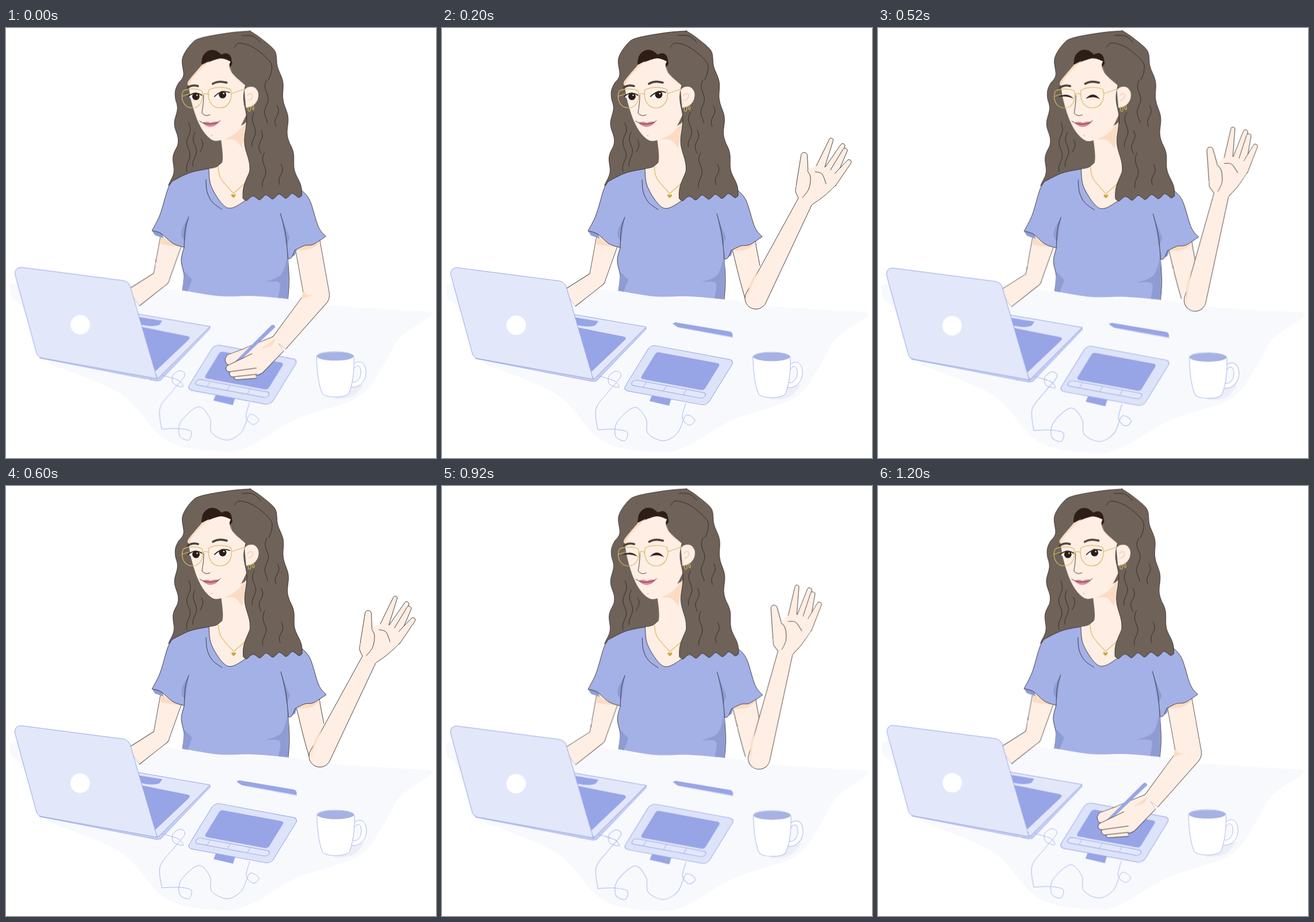
Recreate the animation shown at these times as an HTML page. Size 748 by 748 pixels, loop 1.4 s.

```html
<!DOCTYPE html>
<html lang="en">
<head>
<meta charset="utf-8">
<title>Waving illustrator</title>
<style>
html, body { margin: 0; width: 100%; height: 100%; overflow: hidden; background: #fff; }
svg { display: block; width: 100%; height: 100%; }
.ink, .wire, .gold, .brow { fill: none; stroke-linecap: round; stroke-linejoin: round; }
.ink { stroke: #2b2422; stroke-width: .85; }
.edge { stroke: #2b2422; stroke-width: 1.4; }
.skin { fill: #feeee4; }
.tan { fill: #fbdcc3; }
.hair { fill: #6f6259; }
.shirt { fill: #a4b1e7; }
.dim { fill: #8f9cd3; }
.pale { fill: #e3e7fa; stroke: #98a7e5; }
.blue { fill: #97a5e6; }
.wire { stroke: #aab6ec; }
.cup { fill: #fff; }
.gold { stroke: #d8bd5f; stroke-width: 1.2; }
.dark { fill: #2d1d16; }
.brow { stroke: #4c403b; stroke-width: 3.6; }

#scene, .write, .wave, .arm, .open, .shut { animation: 1.4s step-end infinite; }
#scene { transform-origin: 200px 100px; animation-name: size; }
.write { animation-name: write; }
.wave { animation-name: wave; }
.arm { transform-origin: 548px 471px; animation-name: swing; }
.open { animation-name: open; }
.shut { animation-name: shut; }
@keyframes size {
  0%, 85.714%, 100% { transform: scale(.998); }
  14.286%, 42.857%, 71.428% { transform: scale(1); }
  28.571%, 57.143% { transform: scale(1.002); }
}
@keyframes write {
  0%, 85.714%, 100% { visibility: visible; }
  14.286% { visibility: hidden; }
}
@keyframes wave {
  0%, 85.714%, 100% { visibility: hidden; }
  14.286% { visibility: visible; }
}
@keyframes swing {
  0%, 42.857%, 71.428%, 100% { transform: none; }
  28.571%, 57.143% { transform: translate(5px, 2.5px) rotate(-13deg); }
}
@keyframes open {
  0%, 42.857%, 71.428%, 100% { visibility: visible; }
  28.571%, 57.143% { visibility: hidden; }
}
@keyframes shut {
  0%, 42.857%, 71.428%, 100% { visibility: hidden; }
  28.571%, 57.143% { visibility: visible; }
}
</style>
</head>
<body>
<svg viewBox="0 0 748 748">
<defs>
  <g id="left-arm">
    <path data-taper="289 365 20 270 436 14"/>
    <path data-taper="222 470 17 270 436 14"/>
  </g>
  <g id="right-arm">
    <path data-taper="523 365 22 541 465 22"/>
    <path data-taper="475 550 15 542 467 20"/>
    <path data-taper="475 550 15 432 579 26"/>
    <path data-taper="428 570 15 392 578 10"/>
  </g>
</defs>
<g id="scene">
  <path fill="#f7f9fd" data-p="5 447 70 437 140 434 240 448 370 467 491 472 560 483 737 494 / 739 502 685 541 655 592 612 644 505 682 425 728 375 738 280 719 200 638 75 585 / 29 490 10 470 5 447z"/>

  <use class="edge" href="#left-arm"/>
  <use class="skin" href="#left-arm"/>
  <path class="tan" data-p="270 360 285 373 309 382 / 285 379 269 376 / 270 360z"/>

  <!-- laptop -->
  <path d="M58 575L262 615L269 614L355 524V520L262 608Z" fill="#c6cef1" stroke="#98a7e5" stroke-width=".8"/>
  <path class="pale" d="M228 498L355 520L264 611L240 560Z"/>
  <path class="blue" d="M232 520L317 537Q322 539 318 543L260 598ZM229 503L272 510L267 517Q254 522 233 516Z"/>
  <path class="pale" d="M15 428Q16 416 27 417L204 440Q213 442 216 450L263 611L62 575Q55 573 53 567Z"/>
  <circle cx="129" cy="517" r="17" fill="#fff"/>

  <!-- cable and tablet -->
  <path class="wire" data-p="272 605 300 614 308 625 292 620 290 606 303 597 311 606 290 632 268 662 271 699 / 300 698 322 703 318 718 302 710 305 685 335 660 355 680 358 705 385 718 410 704 424 674 440 682 430 691 418 678 424 653"/>
  <path class="blue" d="M366 637L399 644L395 657L361 649Z"/>
  <g transform="matrix(1 .186 -.522 .848 363 551)">
    <rect class="pale" width="146" height="93" rx="9" style="fill:#dde3f8"/>
    <rect class="blue" x="16" y="11" width="111" height="55" rx="5"/>
    <rect class="pale" x="7" y="70" width="127" height="11" rx="5.5"/>
    <path class="wire" d="M29 70v11m35-11v11m35-11v11"/>
  </g>

  <!-- cup -->
  <path d="M570 646Q600 648 612 636L624 620L600 625Z" fill="#eceef8"/>
  <path class="wire cup" d="M604 588C612 576 628 580 627 602C626 618 612 628 601 625V616C610 620 617 612 618 602C619 586 610 584 604 597Z"/>
  <path class="wire cup" d="M541 572C541 561 605 561 606 573C607 600 603 623 597 637C590 645 557 645 551 637C544 622 541 595 541 572Z"/>
  <ellipse cx="573.5" cy="572" rx="32" ry="7.5" fill="#a6b2e3"/>

  <!-- drawing arm -->
  <g class="write">
    <use class="edge" href="#right-arm"/>
    <use class="skin" href="#right-arm"/>
    <path class="tan" data-p="518 456 524 465 536 465 / 524 469 514 473 / 518 456z"/>
    <path class="tan" data-p="470 541 462 553 446 558 / 460 548 470 541z"/>
    <path class="blue" d="M396 584L462 518Q467 515 469 521L407 580Z"/>
    <path class="skin ink" data-taper="432 598 13 402 608 5"/>
    <path class="skin ink" data-taper="432 590 14 395 602 6"/>
    <path class="skin ink" data-taper="432 580 13 389 593 6"/>
  </g>

  <!-- waving arm -->
  <g class="wave">
    <path d="M402 515L410 514L506 532V539L410 521Z" fill="#c9d0f2"/>
    <path class="blue" d="M401 514L406 512L501 528Q505 529 505 533V537L410 520Z"/>
    <path class="skin ink" data-p="527 470 / 516 430 502 372 / 545 358 / 546 376 553 413"/>
    <g class="arm">
      <path class="skin ink" data-taper="632 301 13 546 470 19"/>
      <path class="tan" data-p="553 415 536 446 530 474 / 537 453 553 415z"/>
      <path class="skin ink" data-taper="655 250 8 677 195 3.5"/>
      <path class="skin ink" data-taper="668 254 8 697 205 4"/>
      <path class="skin ink" data-taper="676 262 8 701 213 4"/>
      <path class="skin ink" data-taper="678 270 8 708 233 4"/>
      <path class="skin ink" data-taper="627 275 11 630 222 5.5"/>
      <path class="skin" data-p="616 276 637 248 660 240 686 258 674 283 644 308 / 620 297 616 276z"/>
      <path class="ink" data-p="616 276 615 284 620 296"/>
      <path class="ink" data-p="684 274 674 284 660 296 644 307"/>
      <path class="ink" data-p="636 249 641 260 638 280 627 295"/>
      <path class="ink" data-p="649 250 661 254 668 271"/>
    </g>
  </g>
  <path class="tan" data-p="503 385 520 378 546 374 / 530 385 503 388z"/>

  <!-- hair behind -->
  <path class="hair ink" data-p="425 5 390 8 340 17 322 28 307 53 309 82 300 96 / ~3,57 295 125 297 205 285 275 / 296 264 320 255 354 245 / 366 242 376 234 / 420 200 / 440 100 / 425 5z"/>
  <path class="dark" data-p="340 62 343 48 353 39 365 39 375 46 / 384 44 391 49 394 62 / 385 68 342 66 / 340 62z"/>

  <!-- neck -->
  <path class="skin" data-p="374 190 376 235 351 246 / 358 288 395 316 426 297 / 418 165 / 374 190z"/>
  <path class="tan" data-p="418 163 402 181 378 194 / 398 195 411 209 / 418 163z"/>
  <path class="gold" data-p="369 241 374 262 396 288 / 420 267"/>
  <path d="M396 296L392.5 292.5Q391.5 289 394 289.3L396 290.5L398 289.3Q400.5 289 399.5 292.5Z" fill="#c5a83f"/>

  <!-- shirt -->
  <path class="dim" d="M254 353L270 350L274 366L259 361ZM488 370L491 402L503 396L510 375Z"/>
  <g id="torso"></g>
  <path class="dim" data-p="318 329 307 349 306 363 312 371 / 318 329z"/>
  <path class="dim" data-p="479 325 486 345 494 365 / 488 380 / 479 325z"/>
  <path class="dim" data-p="492 388 480 428 452 442 / 476 444 474 470 / 491 472 / 492 388z"/>
  <path class="dim" data-p="310 424 324 438 / 316 459 / 307 457 / 310 424z"/>
  <path class="ink" data-p="318 329 312 350 310 382"/>
  <path class="ink" data-p="478 323 487 360 491 402"/>
  <path class="ink" data-p="348 264 350 285 359 303 376 316"/>

  <!-- face -->
  <path class="skin" data-p="341 64 372 53 391 58 / 389 66 395 80 417 100 / 419 150 / 402 181 380 194 / 362 196 346 183 333 160 322 125 317 93 / 328 80 341 64z"/>
  <path class="tan" data-p="354 57 326 86 319 101 / 317 93 341 64 / 354 57z"/>
  <path class="tan" data-p="390 66 397 84 416 101 / 395 80 390 66z"/>
  <path class="brow" d="M316 104Q324 98 334 101M360 97Q370 91 384 95"/>
  <g class="open">
    <path d="M318 119Q330 109 341 118Q335 127 323 124ZM363 119Q375 107 389 115Q383 126 370 123Z" fill="#fff"/>
    <circle class="dark" cx="330.500" cy="119" r="6.500"/>
    <circle class="dark" cx="377" cy="116" r="6.500"/>
    <path class="ink" style="stroke-width:1.8" d="M317 119Q329 109 341 117M363 119Q375 107 389 112"/>
    <g fill="#fff"><circle cx="332.500" cy="117" r="1.200"/><circle cx="379" cy="114" r="1.300"/></g>
  </g>
  <path class="dark shut" d="M313 120Q330 111 340 123Q329 117 313 120ZM361 123Q374 108 386 124Q374 117 361 123Z"/>
  <path class="ink" d="M344 117C344 131 342 140 341 148Q347 155 355 151"/>
  <path d="M342 165Q350 161 356 165Q364 161 371 164Q364 172 355 172Q347 171 342 165Z" fill="#da879c"/>
  <path class="ink" d="M337 162Q346 168 356 167Q367 167 373 161"/>
  <circle cx="358" cy="187" r=".8" fill="#b98a70"/>

  <!-- hair in front -->
  <path class="hair ink" data-p="417 100 / ~3,80 416 170 422 250 413 297 / ~4,23 515 291 / ~2.5,62 494 200 485 125 473 55 / 467 38 443 17 425 5"/>
  <path class="ink" data-p="397 34 407 26 433 35 460 59 462 76 457 90"/>
  <path class="ink" data-p="411 13 430 14 443 25"/>
  <g id="strands"></g>

  <!-- ear and glasses -->
  <path class="skin" data-p="415 108 421 103 432 103 439 112 438 125 430 135 418 139 / 415 108z"/>
  <path d="M420 118Q425 111 429 116Q430 124 421 126" fill="none" stroke="#f6ceb2" stroke-width="1.400"/>
  <path class="gold" d="M422 137Q420 145 424 145Q427 144 425 137M428 135Q428 142 431 142Q433 140 430 134"/>
  <path class="gold" d="M308 110C315 105 333 105 341 109C345 125 338 139 324 139C310 139 303 124 308 110ZM353 108C360 103 380 101 391 107C395 120 390 139 372 139C356 139 350 122 353 108ZM342 116Q347 112 353 116M393 114L416 106M306 119L318 115"/>
</g>
</svg>
<script>
// Points along a polyline, pushed sideways by a sine wave.
function wavy(pts, amp, period) {
  const out = [pts[0]];
  let s = 0;
  for (let i = 1; i < pts.length; i++) {
    const [x, y] = pts[i - 1], dx = pts[i][0] - x, dy = pts[i][1] - y;
    const len = Math.hypot(dx, dy), n = Math.ceil(len / 6);
    for (let k = 1; k <= n; k++) {
      const t = k / n, off = amp * Math.sin((s + t * len) / period * 2 * Math.PI) / len;
      out.push([x + dx * t - dy * off, y + dy * t + dx * off]);
    }
    s += len;
  }
  return out;
}

// Smooth curve through points; "/" marks a corner, "~amp,period" a wavy run.
function smooth(text) {
  let last, d = '';
  for (const run of text.replace('z', '').split('/')) {
    const words = run.trim().split(/\s+/);
    const wave = words[0][0] === '~' && words.shift().slice(1).split(',').map(Number);
    let p = last ? [last] : [];
    for (let i = 0; i < words.length; i += 2) p.push([+words[i], +words[i + 1]]);
    if (wave) p = wavy(p, ...wave);
    if (!last) d = 'M' + p[0];
    for (let i = 0; i + 1 < p.length; i++) {
      const b = p[i], c = p[i + 1], a = p[i - 1] || b, e = p[i + 2] || c;
      const c1 = b.map((v, j) => v + (c[j] - a[j]) / 6);
      const c2 = c.map((v, j) => v - (e[j] - b[j]) / 6);
      d += 'C' + [c1, c2, c].join(' ');
    }
    last = p[p.length - 1];
  }
  return d + (text.endsWith('z') ? 'Z' : '');
}

// Limb or finger: open at the first end, round at the second.
function taper(text) {
  const [x, y, r, tx, ty, tr] = text.split(' ').map(Number);
  const len = Math.hypot(tx - x, ty - y), nx = (y - ty) / len, ny = (tx - x) / len;
  return `M${x + nx * r} ${y + ny * r}L${tx + nx * tr} ${ty + ny * tr}` +
    `A${tr} ${tr} 0 0 0 ${tx - nx * tr} ${ty - ny * tr}L${x - nx * r} ${y - ny * r}`;
}

const path = (cls, pts) => `<path class="${cls}" data-p="${pts}"/>`;

const torso = '307 457 / 310 432 305 405 310 382 / 290 375 270 358 254 353 / 268 325 281 282 289 267 / ' +
  '320 252 353 245 / 357 275 377 307 395 313 426 294 / 513 281 / 529 300 544 346 557 363 / ' +
  '535 377 520 379 503 387 / 497 400 491 402 / 493 440 491 472';
document.getElementById('torso').innerHTML =
  path('shirt', torso + ' / 430 467 370 467 307 457z') + path('ink', torso);

// Hair strands: top x, top y, length.
const strands = [[318, 165, 85], [329, 181, 60], [340, 194, 22], [432, 147, 60], [444, 178, 40], [454, 90, 75],
  [472, 135, 36], [450, 217, 60], [479, 237, 36]];
document.getElementById('strands').innerHTML = strands.map(([x, y, h], i) =>
  path('ink', `${x} ${y} / ~${i % 2 ? 3 : -3},${h > 50 ? 45 : 38} ${x - 1} ${y + h}`)).join('');

for (const el of document.querySelectorAll('[data-p]')) el.setAttribute('d', smooth(el.dataset.p));
for (const el of document.querySelectorAll('[data-taper]')) el.setAttribute('d', taper(el.dataset.taper));
for (const el of document.querySelectorAll('.skin.ink')) el.style.fill = '#feeee4';
for (const el of document.querySelectorAll('.hair.ink')) el.style.fill = '#6f6259';
</script>
</body>
</html>
```
